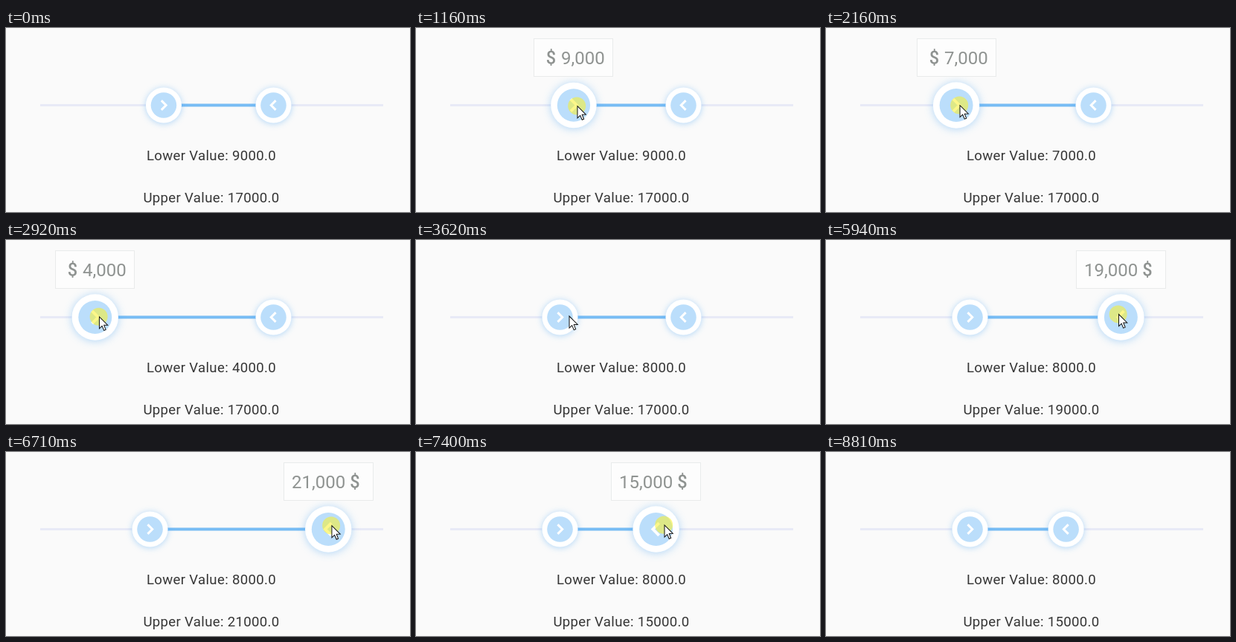
An HTML page with a canvas for the animation above (9.28 s loop, 543 by 249 pixels).

```html
<!DOCTYPE html>
<html lang="en">
<head>
<meta charset="utf-8">
<title>Range slider</title>
<style>
  html, body { margin: 0; width: 100%; height: 100%; overflow: hidden; background: #fafafa; }
  canvas { display: block; width: 543px; height: 249px; }
</style>
</head>
<body>
<canvas id="stage" width="543" height="249"></canvas>
<script>
const ctx = document.getElementById('stage').getContext('2d');
const LOOP = 9280;
const TRACK = { left: 46, right: 507, y: 104.5 };
const STEP = (TRACK.right - TRACK.left) / 25;
const GRAB_OFFSET = 5;
const FONT = 'Roboto, sans-serif';

const ENTER = { from: 70, to: 760, x: 217 };
const LEAVE = { from: 8310, to: 8810, x: 498 };
const MOVES = [
  ENTER,
  { from: 1390, to: 2160, x: 180 },
  { from: 2160, to: 2620, x: 125 },
  { from: 2900, to: 3390, x: 206 },
  { from: 3620, to: 4150, x: 365 },
  { from: 5600, to: 6400, x: 438 },
  { from: 6700, to: 7400, x: 334 },
  LEAVE
];
const PRESSES = {
  lower: { start: 890, end: 3620, initial: 9 },
  upper: { start: 4430, end: 7870, initial: 17 }
};

const clamp = v => Math.min(1, Math.max(0, v));
const smooth = v => v * v * (3 - 2 * v);
const progress = (move, t) => smooth(clamp((t - move.from) / (move.to - move.from)));
const valueX = v => TRACK.left + v * STEP;

const pointerX = t => MOVES.reduce((x, move) => x + (move.x - x) * progress(move, t), 398);

// The pointer drifts up slowly while it works; it enters and leaves below.
const pointerY = t =>
  107 - t / 925 + 140 * (1 - progress(ENTER, t) + progress(LEAVE, t));

function valueAt(press, t) {
  if (t < press.start) return press.initial;
  const x = pointerX(Math.min(t, press.end)) - GRAB_OFFSET;
  return Math.round((x - TRACK.left) / STEP);
}

function elasticOut(k) {
  if (k <= 0 || k >= 1) return clamp(k);
  return 2 ** (-10 * k) * Math.sin((k - 0.1) * 2 * Math.PI / 0.4) + 1;
}

const isHeld = (press, t) => t >= press.start && t < press.end;

function disc(x, y, r, color) {
  ctx.fillStyle = color;
  ctx.beginPath();
  ctx.arc(x, y, r, 0, 2 * Math.PI);
  ctx.fill();
}

function write(text, x, y, size, color, align, weight = 400) {
  ctx.font = `${weight} ${size}px ${FONT}`;
  ctx.fillStyle = color;
  ctx.textAlign = align;
  ctx.fillText(text, x, y);
}

function drawTrack(x0, x1) {
  ctx.fillStyle = '#e8eaf6';
  ctx.fillRect(TRACK.left, TRACK.y - 1.5, TRACK.right - TRACK.left, 3);
  ctx.fillStyle = '#78bcf4';
  ctx.fillRect(x0, TRACK.y - 2, x1 - x0, 4);
}

function drawHandle(x, scale, direction) {
  ctx.save();
  ctx.translate(x, TRACK.y);
  ctx.scale(scale, scale);
  ctx.shadowColor = 'rgba(66, 160, 245, 0.4)';
  ctx.shadowBlur = 9 * scale;
  ctx.shadowOffsetY = 1;
  disc(0, 0, 24, '#fff');
  ctx.shadowColor = 'transparent';
  disc(0, 0, 17.3, '#bbdefb');
  ctx.scale(direction, 1);
  ctx.strokeStyle = '#fff';
  ctx.lineWidth = 3;
  ctx.beginPath();
  ctx.moveTo(-3.1, -6.4);
  ctx.lineTo(3.2, 0);
  ctx.lineTo(-3.1, 6.4);
  ctx.stroke();
  ctx.restore();
}

function drawTooltip(x, value, shown, signFirst) {
  const text = value + ',000', pad = 11, signWidth = 26, color = '#8f9391';
  ctx.save();
  ctx.globalAlpha = shown;
  ctx.translate(0, 14 * (1 - shown));
  ctx.font = `400 24px ${FONT}`;
  const width = Math.ceil(ctx.measureText(text).width + signWidth + 2 * pad);
  const left = Math.round(x - width / 2);
  ctx.fillStyle = '#fdfdfd';
  ctx.strokeStyle = '#e9ebeb';
  ctx.lineWidth = 1;
  ctx.fillRect(left, 14, width, 52);
  ctx.strokeRect(left + 0.5, 14.5, width - 1, 51);
  write(text, left + pad + (signFirst ? signWidth : 0), 49, 24, color, 'left');
  write('$', signFirst ? left + 23.5 : left + width - 25, 48.5, 23.5, color, 'center', 500);
  ctx.restore();
}

function drawPointer(x, y) {
  // Half of the arrow along its axis; the other half is its mirror image.
  const half = [[0, 0], [14.8, 6.1], [13, 1.4], [19.5, 1.3]];
  const mirrored = half.map(([along, across]) => [along, -across]).reverse();
  ctx.save();
  ctx.translate(x, y);
  ctx.rotate(Math.PI * 3 / 8);
  ctx.beginPath();
  [...half, ...mirrored].forEach(point => ctx.lineTo(...point));
  ctx.closePath();
  ctx.fillStyle = '#fff';
  ctx.fill();
  ctx.strokeStyle = '#111';
  ctx.lineWidth = 1;
  ctx.stroke();
  ctx.restore();
}

function drawLabel(name, value, y) {
  ctx.letterSpacing = '0.33px';
  write(`${name} Value: ${value}000.0`, 276, y, 18.6, '#363636', 'center');
  ctx.letterSpacing = '0px';
}

function drawThumb(press, value, t, isLower) {
  const held = isHeld(press, t), age = t - press.start, x = valueX(value);
  drawHandle(x, held ? 1 + 0.3 * elasticOut(age / 700) : 1, isLower ? 1 : -1);
  if (held) drawTooltip(x, value, smooth(clamp(age / 200)), isLower);
}

function draw(t) {
  const lower = valueAt(PRESSES.lower, t);
  const upper = valueAt(PRESSES.upper, t);
  const x = pointerX(t), y = pointerY(t);

  ctx.fillStyle = '#fafafa';
  ctx.fillRect(0, 0, 543, 249);
  drawTrack(valueX(lower), valueX(upper));
  drawThumb(PRESSES.lower, lower, t, true);
  drawThumb(PRESSES.upper, upper, t, false);
  drawLabel('Lower', lower, 179.3);
  drawLabel('Upper', upper, 235.8);

  if (Object.values(PRESSES).some(press => isHeld(press, t))) {
    disc(x - 0.8, y - 0.2, 12, 'rgba(250, 240, 40, 0.55)');
  }
  if (t >= ENTER.from && t < LEAVE.to) drawPointer(x, y);
}

const origin = performance.now();
function tick() {
  draw((performance.now() - origin) % LOOP);
  requestAnimationFrame(tick);
}
tick();
</script>
</body>
</html>
```
